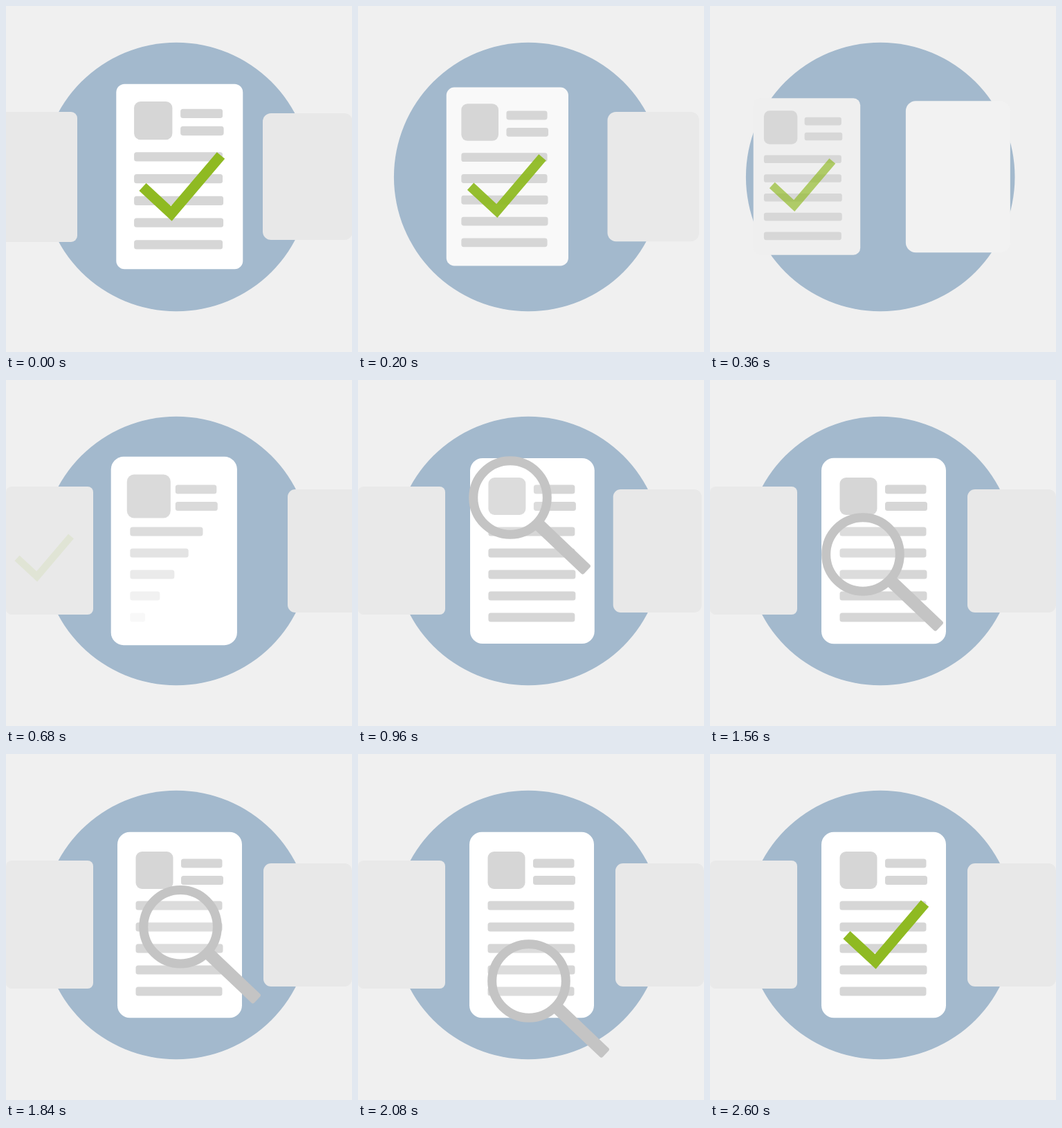
Recreate the animation shown at these times as an HTML page with a canvas. Size 500 by 500 pixels, loop 2.92 s.

```html
<!DOCTYPE html>
<html lang="en">
<head>
<meta charset="utf-8">
<style>
  html, body { margin: 0; height: 100%; overflow: hidden; background: #f0f0f0; }
  canvas { display: block; }
</style>
</head>
<body>
<canvas id="stage" width="500" height="500"></canvas>
<script>
const ctx = document.getElementById('stage').getContext('2d');
const LOOP = 2920, STEP = 40;
const GREY = '#d6d6d6', GREEN = '#8fba22';
const REST_CARD = [0, 154, 126, 185];

const clamp = v => Math.min(1, Math.max(0, v));
const lerp = (a, b, f) => a + (b - a) * f;
const ramp = (t, from, to) => clamp((t - from) / (to - from));
const smooth = (t, from, to) => { const u = ramp(t, from, to); return u * u * (3 - 2 * u); };
const shade = v => { const n = Math.round(v); return `rgb(${n},${n},${n})`; };

// Eased value through points [time, value, value...]
function track(t, keys) {
  const i = keys.findIndex(k => k[0] > t);
  if (i === 0) return keys[0].slice(1);
  if (i < 0) return keys[keys.length - 1].slice(1);
  const a = keys[i - 1], b = keys[i], f = smooth(t, a[0], b[0]);
  return a.slice(1).map((v, j) => lerp(v, b[j + 1], f));
}

function box(x, y, w, h, r, fill) {
  if (w <= 0 || h <= 0) return;
  ctx.fillStyle = fill;
  ctx.beginPath();
  ctx.roundRect(x, y, w, h, r);
  ctx.fill();
}

// Runs draw() scaled about (cx, cy), with that point moved to (x, y)
function placed(cx, cy, x, y, scale, alpha, draw) {
  ctx.save();
  ctx.globalAlpha = alpha;
  ctx.translate(x, y);
  ctx.scale(scale, scale);
  ctx.translate(-cx, -cy);
  draw();
  ctx.restore();
}

function portrait() { box(187.5, 141, 54, 54, 9, GREY); }

function headLines() {
  box(253, 151.5, 59.5, 13, 3.5, GREY);
  box(253, 176, 61, 13, 3.5, GREY);
}

function textLine(i, part) {
  const w = i === 2 || i === 3 ? 126 : 125;
  box(187.5, 212.5 + 31 * i, w * part, 13, 3.5, GREY);
}

function checkMark(part) {
  const length = 167;
  ctx.strokeStyle = GREEN;
  ctx.lineWidth = 15;
  ctx.setLineDash([length * part, length * 2]);
  ctx.beginPath();
  ctx.moveTo(197.5, 261.5);
  ctx.lineTo(239, 300);
  ctx.lineTo(310.5, 216);
  ctx.stroke();
  ctx.setLineDash([]);
}

function leavingCard(t) {
  const [x] = track(t, [[0, -25], [40, -32], [240, -140]]);
  box(x, 153, 128, 188, 9, '#e8e8e8');
}

function outgoingPage(t) {
  const move = smooth(t, 40, 600), shrink = smooth(t, 80, 640), fade = smooth(t, 40, 520);
  const start = [159.3, 112.7, 183, 267.6];
  const [x, y, w, h] = start.map((v, i) => lerp(v, REST_CARD[i], i ? shrink : move));
  box(x, y, w, h, lerp(12, 8, shrink), shade(lerp(255, 233, fade)));

  const textAlpha = 1 - smooth(t, 320, 600);
  placed(250.3, 245.3, 249.4 - 190 * move, 244.8, 1.024 * (1 - 0.25 * shrink), textAlpha, () => {
    portrait();
    headLines();
    for (let i = 0; i < 5; i++) textLine(i, 1);
  });
  placed(254, 261, 254 - 199 * move, 261 - 4 * move, 1 - 0.31 * fade, 1 - ramp(t, 166, 737), () => checkMark(1));
}

function incomingPage(t) {
  const [f] = track(t, [[130, 0], [660, 1.045], [940, 0.995], [1100, 1]]);
  const end = [161, 112.7, 180, 268.6];
  const [x, y, w, h] = [371, 155, 130, 183].map((v, i) => lerp(v, end[i], f));
  box(x, y, w, h, lerp(12, 18, f), shade(lerp(232, 255, clamp(f))));

  ctx.save();
  ctx.translate(x + w / 2 - 251, 0);
  const [pop] = track(t, [[440, 0], [670, 1.17], [840, 0.98], [940, 1]]);
  const alpha = smooth(t, 440, 740);
  placed(214.5, 168, 214.5, 168, pop, alpha, portrait);
  placed(0, 0, 0, 0, 1, alpha, headLines);
  for (let i = 0; i < 5; i++) {
    const part = ramp(t, 478 + 40 * i, 718 + 40 * i);
    placed(0, 0, 0, 0, 1, part, () => textLine(i, part));
  }
  ctx.restore();
}

function nextCard(t) {
  const [x] = track(t, [[520, 520], [680, 407], [860, 367.5], [960, 368.7], [1100, 372]]);
  box(x, 158, 128, 178, 11, '#e8e8e8');
}

function magnifier(t) {
  const [x, y] = track(t, [
    [680, 590, 470], [960, 220, 170], [1040, 222, 170], [1240, 284, 161],
    [1440, 215, 266], [1550, 221, 252], [1770, 221, 252], [1920, 290, 247],
    [2070, 247, 328], [2140, 247, 328], [2320, 343, 357], [2480, 600, 540]
  ]);
  ctx.save();
  ctx.translate(x, y);
  ctx.beginPath();
  ctx.arc(0, 0, 53.3, 0, Math.PI * 2);
  ctx.fillStyle = 'rgba(255,255,255,.15)';
  ctx.fill();
  ctx.strokeStyle = '#c4c4c4';
  ctx.lineWidth = 13;
  ctx.stroke();
  ctx.rotate(0.76);
  box(56, -9, 97, 18, 3, '#c4c4c4');
  ctx.restore();
}

function draw(t) {
  ctx.fillStyle = '#f0f0f0';
  ctx.fillRect(0, 0, 500, 500);
  ctx.fillStyle = '#a3b9cd';
  ctx.beginPath();
  ctx.arc(246.2, 247, 194.3, 0, Math.PI * 2);
  ctx.fill();

  leavingCard(t);
  outgoingPage(t);
  nextCard(t);
  incomingPage(t);
  if (t > 2320) checkMark(ramp(t, 2320, 2600));
  if (t > 680 && t < 2480) magnifier(t);
}

function frame(now) {
  draw(Math.floor((now % LOOP) / STEP) * STEP);
  requestAnimationFrame(frame);
}
requestAnimationFrame(frame);
</script>
</body>
</html>
```
